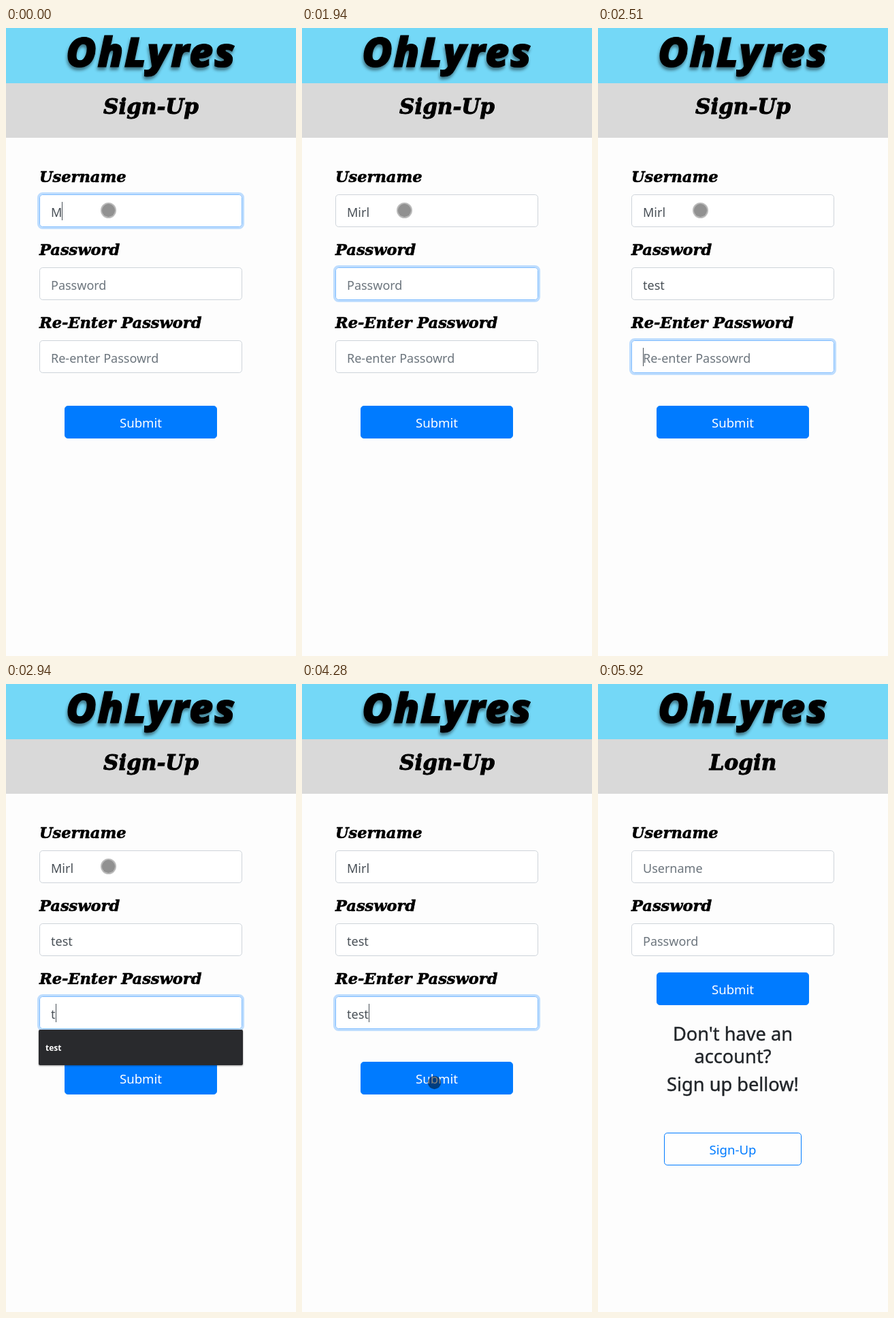
Animation of 426 by 921 pixels, one loop 6170 ms. Source, as an HTML page:

```html
<!DOCTYPE html>
<html lang="en">
<head>
<meta charset="utf-8">
<title>Sign-up flow</title>
<style>
  html, body { margin: 0; width: 100%; height: 100%; overflow: hidden; background: #fdfdfd; }
  svg { display: block; width: 426px; height: 921px; }
  text { font: 18px "Noto Sans", "Open Sans", sans-serif; white-space: pre; }
  .middle { text-anchor: middle; }
  .brand { font: italic 800 61px "Open Sans", "Noto Sans", sans-serif; letter-spacing: 1.5px;
           stroke: #000; stroke-width: 1.2px;
           filter: drop-shadow(-1px 4px 2px rgba(0, 0, 0, .45)); }
  .heading, .label { font: italic 700 22.5px "DejaVu Serif", "Noto Serif", serif; stroke: #000; stroke-width: .6px; }
  .heading { font-size: 31px; stroke-width: 1px; }
  .prompt { font-size: 27.2px; fill: #212529; stroke: #212529; stroke-width: .4px; }
  .placeholder { fill: #6c757d; }
  .value, .caret { fill: #495057; }
  .button { font-size: 18.6px; }
  .option { font-size: 12px; font-weight: 600; fill: #fff; }
  .menu { fill: #292a2d; filter: drop-shadow(0 1px 1px rgba(0, 0, 0, .4)); }
</style>
</head>
<body>
<svg id="stage" viewBox="0 0 426 921"></svg>
<script>
const LOOP = 6170;
const FIELDS = [
  { label: "Username", hint: "Username", y: 244 },
  { label: "Password", hint: "Password", y: 351 },
  { label: "Re-Enter Password", hint: "Re-enter Passowrd", y: 458 },
];

// Each step changes part of the state and keeps the rest.
const STEPS = [
  [0, { page: "signup", values: ["M", "", ""], focus: 0, caret: true, menu: 0, pressed: false, cursor: [150.5, 267.5] }],
  [310, { values: ["Mi", "", ""] }],
  [740, { caret: false }],
  [1140, { values: ["Mir", "", ""], caret: true }],
  [1260, { values: ["Mirl", "", ""] }],
  [1540, { focus: 1 }],
  [1940, { caret: false }],
  [2090, { values: ["Mirl", "t", ""], caret: true, menu: 88 }],
  [2210, { values: ["Mirl", "tes", ""], menu: 58 }],
  [2360, { values: ["Mirl", "test", ""], menu: 0 }],
  [2510, { focus: 2 }],
  [2940, { values: ["Mirl", "test", "t"], menu: 52 }],
  [3090, { values: ["Mirl", "test", "tes"] }],
  [3210, { values: ["Mirl", "test", "test"], menu: 0 }],
  [3770, { caret: false, cursor: [149.5, 270.5] }],
  [3920, { cursor: [226, 430] }],
  [4040, { cursor: [280.5, 630] }],
  [4160, { cursor: [262, 659.5] }],
  [4280, { cursor: [194.5, 584.5], caret: true, pressed: true }],
  [4680, { focus: "submit", pressed: false }],
  [4800, { page: "login", values: ["", "", ""], focus: null }],
  [5100, { cursor: [235.5, 607.5] }],
  [5350, { cursor: [200.5, 603.5] }],
  [5500, { cursor: [378.5, 694.5] }],
  [5620, { cursor: null }],
  [5770, { cursor: [424.5, 892.5] }],
  [5920, { cursor: null }],
];

const stage = document.getElementById("stage");

const text = (kind, x, y, content, fill = "") =>
  `<text class="${kind}" x="${x}" y="${y}" ${fill && `fill="${fill}"`}>${content}</text>`;

const box = (x, y, w, h, fill, stroke) =>
  `<rect x="${x + .5}" y="${y + .5}" width="${w - 1}" height="${h - 1}" rx="4.3" fill="${fill}" stroke="${stroke}"/>`;

const ring = (x, y, w, h) =>
  `<rect x="${x - 1.5}" y="${y - 1.5}" width="${w + 3}" height="${h + 3}" rx="6.3" fill="none" stroke="#007bff" stroke-opacity=".25" stroke-width="3"/>`;

function field({ label, hint, y }, value, focused) {
  return text("label", 49, y - 18, label)
    + (focused ? ring(49, y, 298, 48) : "")
    + box(49, y, 298, 48, "#fff", focused ? "#80bdff" : "#ced4da")
    + text(value ? "value" : "placeholder", 66, y + 33, value || hint);
}

function button(x, y, w, label, { fill = "#007bff", stroke = fill, color = "#fff", focused = false } = {}) {
  return (focused ? ring(x, y, w, 48) : "")
    + box(x, y, w, 48, fill, stroke)
    + text("button middle", x + w / 2, y + 32, label, color);
}

function menu(y, height) {
  return `<rect class="menu" x="48" y="${y}" width="300" height="${height}" rx="2"/>`
    + text("option", 58, y + 30.5, "test");
}

function pointer([x, y], pressed) {
  return pressed
    ? `<circle cx="${x}" cy="${y}" r="9.7" fill-opacity=".5"/>`
    : `<circle cx="${x}" cy="${y}" r="9.7" fill-opacity=".43"/>
       <circle cx="${x}" cy="${y}" r="10.6" fill="none" stroke="#000" stroke-opacity=".27" stroke-width="1.8"/>`;
}

function page({ page, values, focus }) {
  const signup = page === "signup";
  const fields = FIELDS.slice(0, signup ? 3 : 2).map((f, i) => field(f, values[i], focus === i)).join("");
  if (signup) {
    const focused = focus === "submit";
    return text("heading middle", 213, 126, "Sign-Up") + fields
      + button(86, 554, 224, "Submit", { fill: focused ? "#0069d9" : "#007bff", focused });
  }
  return text("heading middle", 213, 126, "Login") + fields
    + button(86, 423, 224, "Submit")
    + text("prompt middle", 198, 523, "Don't have an")
    + text("prompt middle", 198, 556, "account?")
    + text("prompt middle", 198, 597, "Sign up bellow!")
    + button(97, 658, 202, "Sign-Up", { fill: "#fefefe", stroke: "#007bff", color: "#007bff" });
}

function addCaret({ y }, value) {
  const typed = value ? stage.querySelectorAll(".value") : [];
  const width = typed.length ? typed[typed.length - 1].getComputedTextLength() : 0;
  stage.insertAdjacentHTML("beforeend",
    `<rect class="caret" x="${Math.round(66 + width)}" y="${y + 11}" width="1" height="27"/>`);
}

function render(state) {
  stage.innerHTML = `<rect width="426" height="921" fill="#fdfdfd"/>
    <rect width="426" height="81" fill="#74d8f7"/>
    <rect y="81" width="426" height="80" fill="#d9d9d9"/>`
    + text("brand middle", 213, 57, "OhLyres")
    + page(state)
    + (state.menu ? menu(FIELDS[state.focus].y + 49, state.menu) : "")
    + (state.cursor ? pointer(state.cursor, state.pressed) : "");
  const active = FIELDS[state.focus];
  if (active && state.caret) addCaret(active, state.values[state.focus]);
}

let shown = 0;
const start = performance.now();

function tick() {
  const time = (performance.now() - start) % LOOP;
  const past = STEPS.filter(([at]) => at <= time);
  if (past.length !== shown) {
    shown = past.length;
    render(Object.assign({}, ...past.map(([, change]) => change)));
  }
  requestAnimationFrame(tick);
}
tick();
</script>
</body>
</html>
```
